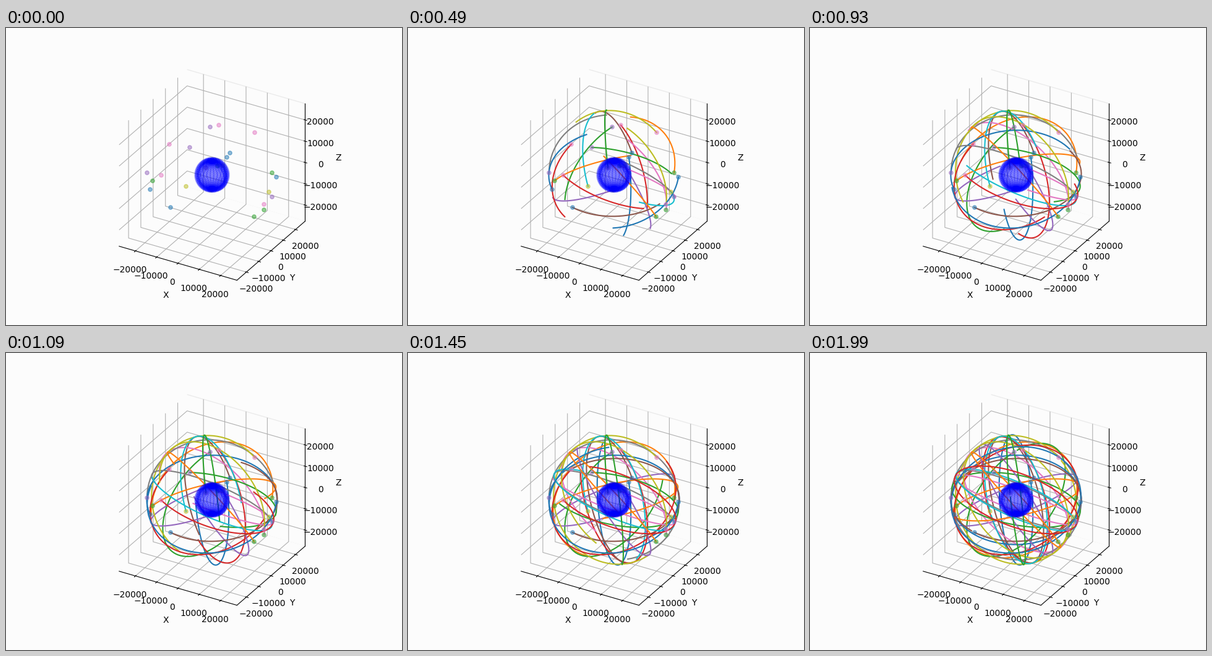
Animation, 640 px wide and 480 px high, one loop 2.01 s. Source, as a matplotlib script:

```python
import numpy as np
import matplotlib.pyplot as plt
from matplotlib.animation import FuncAnimation

BG = "#fcfcfc"
EARTH, ORBIT = 6371, 26560
LIMIT = ORBIT * 25 / 24
STEPS = 99
ELEV, AZIM = np.radians(30), np.radians(-60)

# Per satellite, as seen on screen in hundredths of a tenth of the orbit
# radius (105.5 = one radius): start (right, down), then a quarter turn later.
ORBITS = [
    (24, -28.4, 12.9, 101.4),
    (97, -3.4, 17.5, -93.8),
    (-3, -77.4, -79.6, 48.1),
    (11, -80.4, 52.8, 62.8),
    (-2, 24.6, -99.3, 34.4),
    (29, -35.4, -34.2, -96.1),
    (84, 56.6, 13.6, -62.6),
    (-105, -3.4, -0.3, -97),
    (69, -68.4, -69.5, -78.1),
    (-42, 18.6, -28.9, -101.1),
    (-100, 23.6, -33.3, -68.3),
    (-96, 9.6, 36.5, -32.4),
    (-36, -44.4, 96.8, 2.2),
    (-69, -49.4, -72.5, 73.5),
    (17, -15, 57.2, 88.5),
    (-67, 52.6, 81, 41.8),
    (9, -14.4, 98.3, 38),
    (97, 35.6, -9.3, -31),
    (84, 47.6, 12.7, -80.8),
    (92, 27.6, 31.5, 41.5),
    (104, 3.6, -12.2, 86),
    (68, 67.6, -23.8, -37.4),
    (-10, -11.4, -11.1, -104.1),
    (-82, 0.6, 56.7, 54.7),
]


def view_basis():
    """Right, up and toward-viewer unit vectors of the camera."""
    se, ce, sa, ca = np.sin(ELEV), np.cos(ELEV), np.sin(AZIM), np.cos(AZIM)
    return np.array([[-sa, ca, 0], [-se * ca, -se * sa, ce], [ce * ca, ce * sa, se]])


def lift(right, down, side):
    """Put a screen offset on the unit sphere, in front or behind."""
    a, b = right / 105.5, -down / 105.5
    return np.array([a, b, side * np.sqrt(max(0, 1 - a * a - b * b))])


def orbit_path(x0, y0, x1, y1):
    start = lift(x0, y0, -1)
    quarter = lift(x1, y1, 1 if x0 * x1 + y0 * y1 > 0 else -1)
    quarter -= quarter.dot(start) * start
    quarter /= np.linalg.norm(quarter)
    t = np.linspace(0, 2 * np.pi, STEPS + 1)
    path = np.outer(start, np.cos(t)) + np.outer(quarter, np.sin(t))
    return ORBIT * view_basis().T @ path


fig = plt.figure(figsize=(6.4, 4.8), dpi=100, facecolor=BG)
ax = fig.add_subplot(projection="3d", proj_type="ortho", facecolor=BG)
ax.view_init(30, -60)
ax.set_box_aspect((1, 1, 1))

paths = [orbit_path(*row) for row in ORBITS]
lines = [ax.plot([], [], [], color=f"C{i % 10}")[0] for i in range(len(paths))]

u, v = np.meshgrid(np.linspace(0, 2 * np.pi, 25), np.linspace(0, np.pi, 25))
ax.scatter(EARTH * (np.cos(u) * np.sin(v)).ravel(),
           EARTH * (np.sin(u) * np.sin(v)).ravel(),
           EARTH * np.cos(v).ravel(), color="b", alpha=0.12)

starts = np.array([p[:, 0] for p in paths])
ax.scatter(*starts.T, c=[f"C{2 * i % 10}" for i in range(len(paths))],
           alpha=0.5, depthshade=False)

ticks = range(-20000, 20001, 10000)
ax.set(xlabel="X", ylabel="Y", zlabel="Z", xticks=ticks, yticks=ticks, zticks=ticks)
ax.set(xlim=(-LIMIT, LIMIT), ylim=(-LIMIT, LIMIT), zlim=(-LIMIT, LIMIT))
for axis in (ax.xaxis, ax.yaxis, ax.zaxis):
    axis.set_pane_color(BG)
ax.yaxis.pane.set_edgecolor("0.92")


def update(i):
    # The first state holds for 50 ms, each later one for 20 ms.
    step = max(0, (i - 3) // 2)
    for line, path in zip(lines, paths):
        line.set_data_3d(*path[:, :step + 1])
    return lines


anim = FuncAnimation(fig, update, frames=201, interval=10, repeat=True, repeat_delay=0)
plt.show()
```
